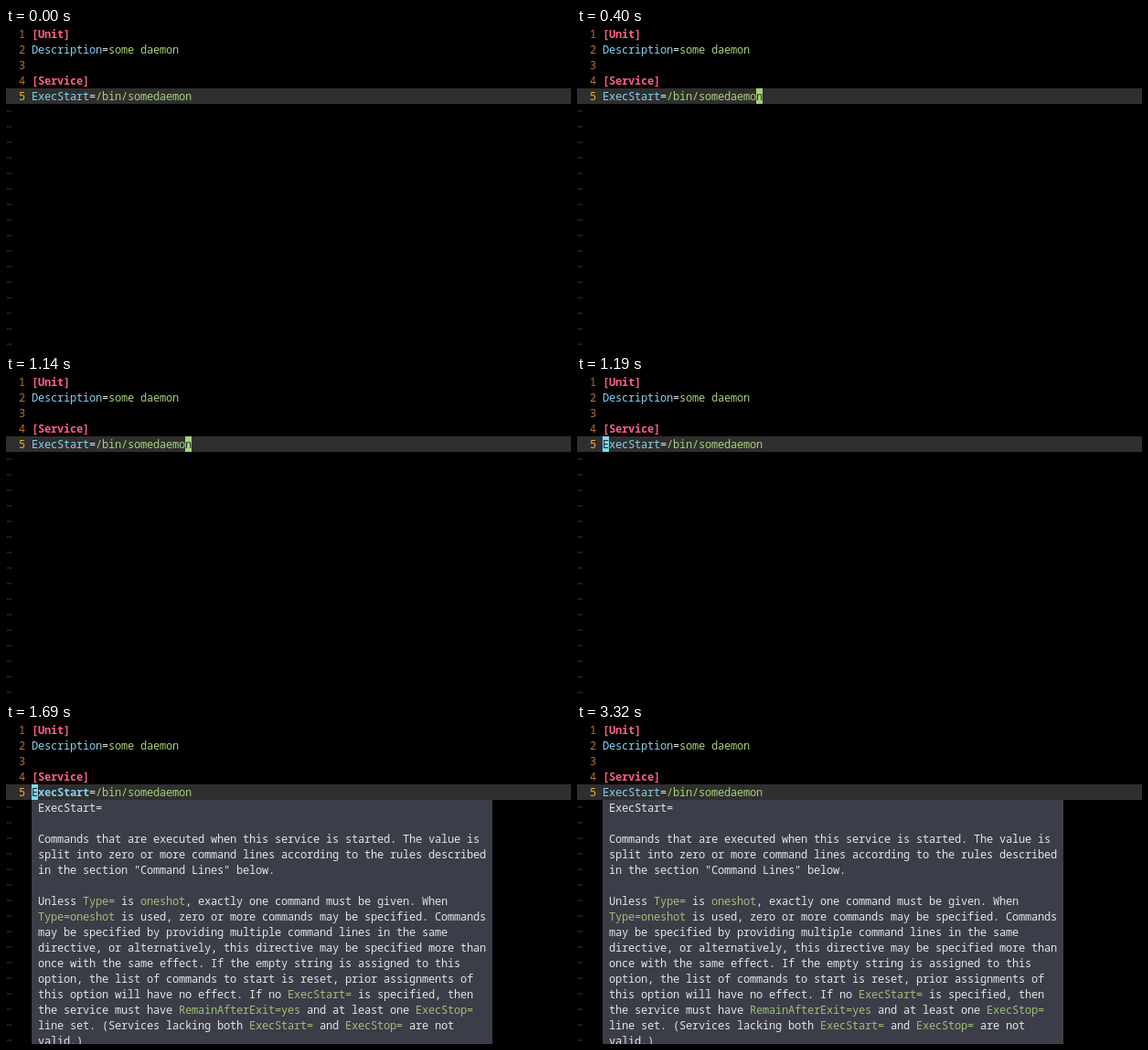
Animation, 618 px wide and 350 px high, one loop 3370 ms. Source, as an HTML page:

```html
<!DOCTYPE html>
<html lang="en">
<head>
<meta charset="utf-8">
<title>Unit file help popup</title>
<style>
  :root {
    --fg: #e4e4e4;
    --key: #86cfee;
    --cursor-key: #78dcf0;
    --value: #a6d07a;
    --link: #9fbf78;
    --head: #ff5f87;
    --num: #b07030;
    --num-now: #ffaf20;
    --band: #2f2f2f;
    --panel: #3b3d48;
    --loop: 3370ms step-end infinite;
  }
  html, body {
    margin: 0;
    width: 100%;
    height: 100%;
    overflow: hidden;
    background: #000;
  }
  #stage {
    position: relative;
    width: 618px;
    height: 350px;
    overflow: hidden;
    background: #000;
  }
  pre, .cursor {
    position: absolute;
    margin: 0;
    font: 12px/17px "Noto Sans Mono", "DejaVu Sans Mono", monospace;
    letter-spacing: -0.2px;
    white-space: pre;
    color: var(--fg);
  }
  b { color: var(--head); }
  i, u, s { font-style: normal; text-decoration: none; }
  i { color: var(--key); }
  u { color: var(--value); }
  s { color: var(--num-now); }

  .band {
    position: absolute;
    top: 66px;
    width: 100%;
    height: 17px;
    background: var(--band);
  }
  .numbers { left: 14px; top: -2px; color: var(--num); }
  .code { left: 28px; top: -2px; }
  .tildes { left: 0; top: 83px; color: #3c3c46; }
  .looked-up { animation: looked-up var(--loop); }

  .cursor {
    top: 66px;
    width: 7px;
    height: 17px;
    color: #26262a;
    opacity: 0;
  }
  .at-end { left: 196px; background: var(--value); animation: at-end var(--loop); }
  .at-start { left: 28px; background: var(--cursor-key); animation: at-start var(--loop); }
  .popup {
    left: 28px;
    top: 83px;
    width: 497px;
    height: 272px;
    padding-left: 7px;
    background: var(--panel);
    opacity: 0;
    animation: popup var(--loop);
  }
  .popup u { color: var(--link); }

  /* on at 50, off at 640, on at 1140, leaves at 1190 ms */
  @keyframes at-end {
    0% { opacity: 0; }
    1.484% { opacity: 1; }
    18.991% { opacity: 0; }
    33.828% { opacity: 1; }
    35.312%, 100% { opacity: 0; }
  }
  /* on from 1190 to 3320 ms */
  @keyframes at-start {
    0% { opacity: 0; }
    35.312% { opacity: 1; }
    98.516%, 100% { opacity: 0; }
  }
  /* opens at 1690 ms */
  @keyframes popup {
    0% { opacity: 0; }
    50.148%, 100% { opacity: 1; }
  }
  /* bold from 1690 to 2180 ms */
  @keyframes looked-up {
    0% { font-weight: 400; }
    50.148% { font-weight: 700; }
    64.688%, 100% { font-weight: 400; }
  }
</style>
</head>
<body>
<div id="stage">
  <div class="band"></div>
<pre class="numbers">1
2
3
4
<s>5</s></pre>
<pre class="code"><b>[Unit]</b>
<i>Description</i>=<u>some daemon</u>

<b>[Service]</b>
<i class="looked-up">ExecStart</i>=<u>/bin/somedaemon</u></pre>
<pre class="tildes">~
~
~
~
~
~
~
~
~
~
~
~
~
~
~
~</pre>
  <span class="cursor at-end">n</span>
  <span class="cursor at-start looked-up-cursor">E</span>
<pre class="popup">ExecStart=

Commands that are executed when this service is started. The value is
split into zero or more command lines according to the rules described
in the section "Command Lines" below.

Unless <u>Type=</u> is <u>oneshot</u>, exactly one command must be given. When
<u>Type=oneshot</u> is used, zero or more commands may be specified. Commands
may be specified by providing multiple command lines in the same
directive, or alternatively, this directive may be specified more than
once with the same effect. If the empty string is assigned to this
option, the list of commands to start is reset, prior assignments of
this option will have no effect. If no <u>ExecStart=</u> is specified, then
the service must have <u>RemainAfterExit=yes</u> and at least one <u>ExecStop=</u>
line set. (Services lacking both <u>ExecStart=</u> and <u>ExecStop=</u> are not
valid.)</pre>
</div>
</body>
</html>
```
